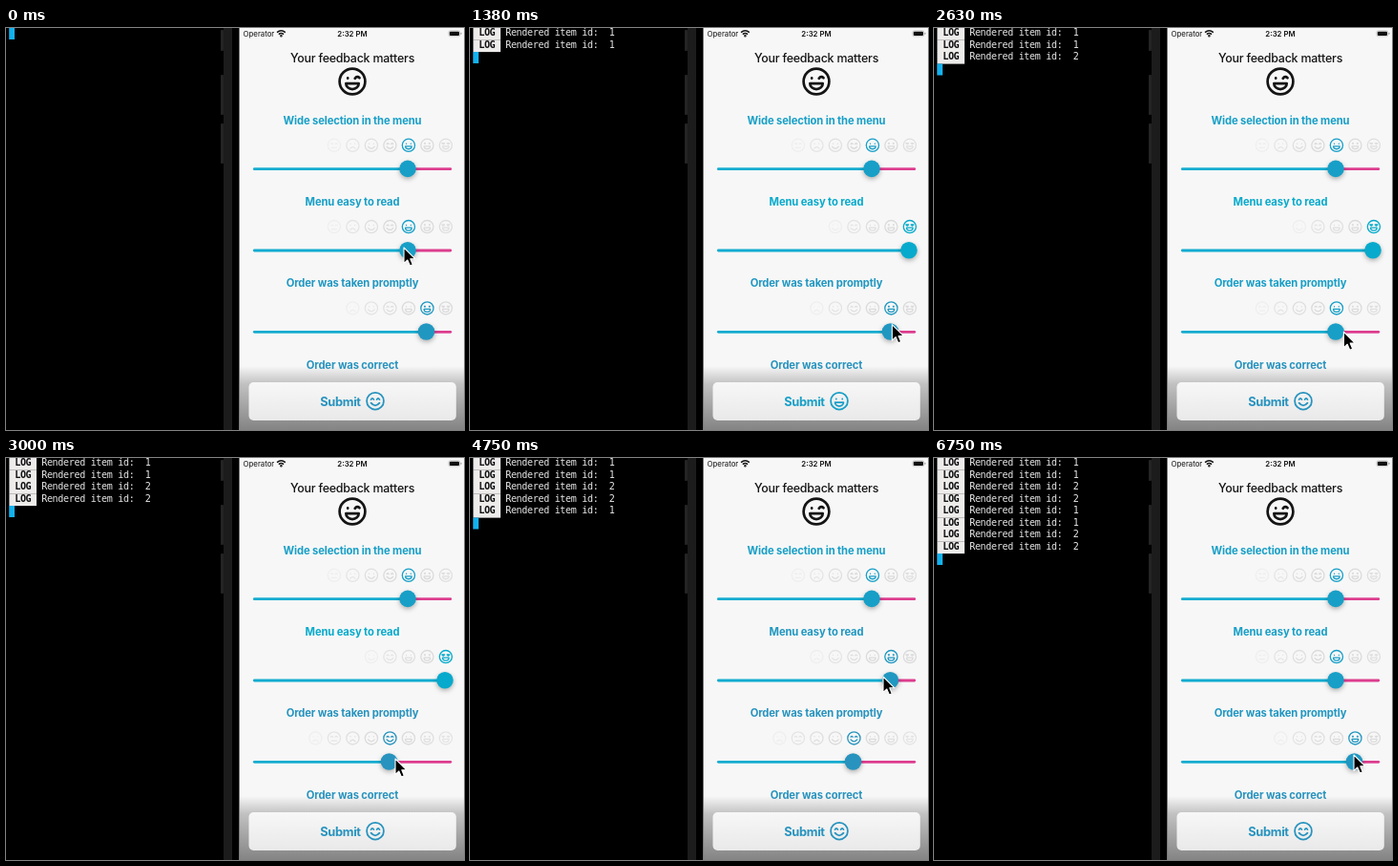
Animation of 480 by 421 pixels, one loop 6.87 s. Source, as an HTML page:

```html
<!DOCTYPE html>
<html lang="en">
<head>
<meta charset="utf-8">
<title>Feedback sliders</title>
<style>
html, body { margin: 0; width: 100%; height: 100%; overflow: hidden; background: #000; }
svg { display: block; width: 100%; height: 100%; }
text { white-space: pre; }
.ui { font-family: Inter, "Open Sans", sans-serif; text-anchor: middle; }
.head { font-size: 12.4px; letter-spacing: -.2px; fill: #151515; font-weight: 500; }
.title { font-size: 11.2px; letter-spacing: -.11px; font-weight: 700; fill: currentColor; }
.submit { font-size: 12.8px; letter-spacing: -.3px; font-weight: 700; fill: currentColor; }
.status { font-size: 7.8px; fill: #111; }
.log { font: 10.1px "DejaVu Sans Mono", monospace; letter-spacing: -.36px; fill: #e8e8e8; }
.tag { font-weight: 700; fill: #111; }
.track { stroke-width: 2.8; stroke-linecap: round; }
.knob { fill: currentColor; filter: drop-shadow(0 2px 2.4px rgba(0,0,0,.3)); }
.face { fill: none; stroke: currentColor; stroke-width: 2; stroke-linecap: round; stroke-linejoin: round; }
</style>
</head>
<body>
<svg viewBox="0 0 480 421" preserveAspectRatio="none">
  <defs>
    <linearGradient id="fade" x2="0" y2="1">
      <stop stop-color="#777" stop-opacity="0"/>
      <stop offset=".28" stop-color="#777" stop-opacity=".42"/>
      <stop offset="1" stop-color="#777" stop-opacity=".9"/>
    </linearGradient>
    <linearGradient id="button" x2="0" y2="1">
      <stop stop-color="#f7f7f7"/><stop offset="1" stop-color="#e9e9e9"/>
    </linearGradient>
    <g id="faces"></g>
  </defs>

  <rect width="480" height="421"/>
  <g id="logs"></g>
  <rect id="caret" x="3.2" width="5.8" height="12" fill="#14b1ee"/>

  <g fill="#242424">
    <rect x="228" width="9" height="421" fill="#1c1c1c"/>
    <rect x="225" y="2" width="3" height="22" rx="1"/>
    <rect x="225" y="49" width="3" height="42" rx="1"/>
    <rect x="225" y="100" width="3" height="42" rx="1"/>
  </g>
  <rect x="244.5" width="235.5" height="421" fill="#f7f7f7"/>

  <g class="ui">
    <text class="status" x="248.6" y="8.6" style="text-anchor:start">Operator</text>
    <text class="status" x="363" y="8.6" font-weight="600">2:32 PM</text>
    <text class="head" x="363" y="36.3">Your feedback matters</text>
  </g>
  <g fill="none" stroke="#111" stroke-width="1.5">
    <path d="M284 4.6q4.4-3.6 8.8 0M285.8 6.6q2.6-2 5.2 0"/>
    <circle cx="288.4" cy="8.2" r=".5"/>
  </g>
  <rect x="463.9" y="2.9" width="12" height="5.8" rx="1.7" fill="none" stroke="#aaa" stroke-width=".6"/>
  <rect x="464.8" y="3.7" width="10.2" height="4.2" rx="1" fill="#111"/>
  <rect x="476.4" y="4.8" width=".9" height="2.2" rx=".4" fill="#999"/>
  <use href="#wink" transform="translate(363 56) scale(1.34)" color="#151515"/>

  <g id="rows"></g>

  <rect x="244.5" y="354" width="235.5" height="67" fill="url(#fade)"/>
  <rect x="254.5" y="371" width="217.3" height="40" rx="5" fill="url(#button)"/>
  <g id="send" class="ui">
    <text class="submit" x="350.5" y="395.5">Submit</text>
    <use transform="translate(387 390.7) scale(.89)"/>
  </g>
  <path id="arrow" d="M0-1V15.6L3.8 12 6.4 18 9.3 16.8 6.8 10.8H11.9Z"
        stroke="#fff" stroke-width="1.1" stroke-linejoin="round"/>
</svg>

<script>
const LOOP = 6870, STEP = 125, NOTCH = 19.5, ROW_GAP = 85.3;
const $ = id => document.getElementById(id);
const tones = { 7: '#2793be', 8: '#179fc7', 9: '#2097c1', 10: '#07aacc' };

// Faces are drawn around their centre, from sad to delighted.
const dots = 'M-3.6-2.6v.2M3.6-2.6v.2';
const arcs = 'M-5-1.8q1.6-2.6 3.2 0M1.8-1.8q1.6-2.6 3.2 0';
const frown = 'M-4 5q4-4.5 8 0', flat = 'M-4 4h8', smile = 'M-5 2.2q5 6 10 0';
const grin = 'M-5 1.6H5a5 4.4 0 0 1-10 0Z';
const looks = [
  arcs + frown, dots + frown, arcs + frown, dots + frown, arcs + flat,
  dots + frown, dots + smile, arcs + smile, dots + grin,
  'M-4.4-3.2h1.4M3-3.2h1.4M-3.7-2.2v.3M3.7-2.2v.3' + grin,
  'M-6-3.2h4l-2 1.8ZM6-3.2H2l2 1.8Z' + grin
];
const face = (id, lines) =>
  `<g id="${id}" class="face"><circle r="10"/><path d="${lines}"/></g>`;
$('faces').innerHTML = looks.map((look, i) => face('face' + i, look)).join('') +
  face('wink', 'M-3.6-2.8v.4M2-2.4q1.8-2.2 3.6-.4' + grin);

const titles = ['Wide selection in the menu', 'Menu easy to read',
  'Order was taken promptly', 'Order was correct'];
const start = [8, 8, 9];
const knobX = v => 460 - (10 - v) * NOTCH;

$('rows').innerHTML = titles.map((title, r) => {
  const icons = looks.map((_, i) =>
    `<use href="#face${i}" transform="translate(${knobX(i) + .9} 122.8) scale(.66)"/>`).join('');
  const slider = r < 3 ? icons +
    `<path class="track rest" stroke="#dd3d8e"/>
     <path class="track fill" stroke="#12acd0"/>
     <circle class="knob" cy="147.4" r="8.8"/>` : '';
  return `<g class="ui" color="#2793be" transform="translate(0 ${r * ROW_GAP})">
    <text class="title" x="363" y="100.8">${title}</text>${slider}</g>`;
}).join('');
const rows = [...$('rows').children].slice(0, 3);

function setRow(row, value) {
  const x = knobX(value);
  row.setAttribute('color', tones[value]);
  row.querySelectorAll('use').forEach((icon, i) => {
    const gap = Math.abs(i - value);
    icon.setAttribute('color', gap ? '#000' : tones[value]);
    icon.setAttribute('opacity', [1, .11, .09, .07, .03][gap] || 0);
  });
  row.querySelector('.fill').setAttribute('d', `M260.3 147.7H${x}`);
  row.querySelector('.rest').setAttribute('d', `M${x} 147.7H465.8`);
  row.querySelector('.knob').setAttribute('cx', x);
}

// Each notch passed: time, row, new value. It also writes one log line.
const changes = [
  [375, 1, 9], [625, 1, 10], [2500, 2, 8], [2875, 2, 7],
  [4750, 1, 9], [5125, 1, 8], [6375, 2, 8], [6625, 2, 9]
];
$('logs').innerHTML = changes.map(([, row], i) =>
  `<g transform="translate(0 ${i * 12.5})">
    <rect x="3.4" width="28.6" height="12.6" fill="#eeebeb"/>
    <text class="log tag" x="9.2" y="8.4">LOG</text>
    <text class="log" x="37.2" y="8.4">Rendered item id:  ${row}</text></g>`).join('');
const logs = [...$('logs').children];

// Pointer path: time, x, y.
const path = [
  [0, 417, 231], [125, 417, 231], [750, 454, 231], [875, 454, 231],
  [1500, 441, 321], [2375, 441, 321], [3000, 408, 316], [3125, 408, 316],
  [4250, 455, 231], [4500, 455, 231], [4750, 433, 230], [5250, 417, 231],
  [5375, 417, 231], [5750, 406, 310], [6250, 406, 310], [6750, 440, 312], [LOOP, 440, 312]
];
function pointer(t) {
  const i = path.findIndex(p => p[0] > t);
  const [t0, x0, y0] = path[i - 1], [t1, x1, y1] = path[i];
  const u = (t - t0) / (t1 - t0), k = u * u * (3 - 2 * u);
  return [x0 + (x1 - x0) * k, y0 + (y1 - y0) * k];
}

function draw(t) {
  const values = [...start];
  const done = changes.filter(c => c[0] <= t);
  done.forEach(([, row, value]) => values[row] = value);
  rows.forEach((row, i) => setRow(row, values[i]));
  logs.forEach((log, i) => log.setAttribute('visibility', i < done.length ? 'visible' : 'hidden'));
  $('caret').setAttribute('y', done.length * 12.5);

  const mood = values[0] + values[1] + values[2] > 26 ? 8 : 7;
  $('send').setAttribute('color', tones[mood]);
  $('send').querySelector('use').setAttribute('href', '#face' + mood);
  $('arrow').setAttribute('transform', `translate(${pointer(t)})`);
}

const begin = performance.now();
let last = -1;
function tick() {
  const t = Math.floor((performance.now() - begin) % LOOP / STEP) * STEP;
  if (t !== last) draw(last = t);
  requestAnimationFrame(tick);
}
tick();
</script>
</body>
</html>
```
